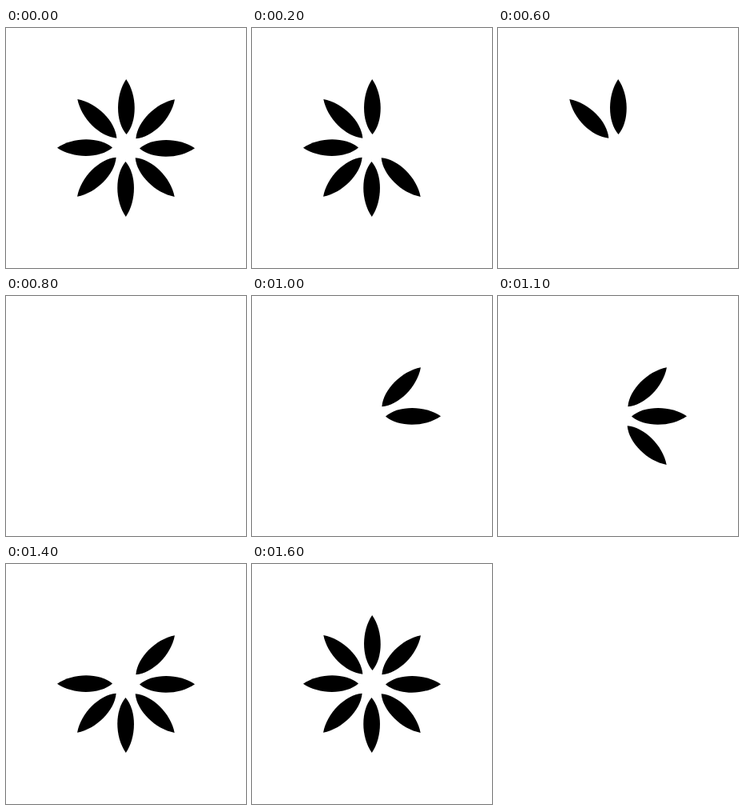
An HTML page that plays this animation: 300x300 px, repeating every 1700 ms.

```html
<!DOCTYPE html>
<html lang="en">
<head>
<meta charset="utf-8">
<title>Petal spinner</title>
<style>
html, body { margin: 0; width: 100%; height: 100%; overflow: hidden; background: #fff; }
svg { display: block; width: 100vw; height: 100vh; }
</style>
</head>
<body>
<svg id="stage" viewBox="0 0 300 300"></svg>
<script>
const NS = 'http://www.w3.org/2000/svg';
const COUNT = 8, STEP = 100, LOOP = 1700;
// Pointed outside, blunter inside, set slightly clockwise of its axis.
const LEAF = 'M0.2 -86 C14.2 -66 14.2 -33 0.5 -17 C-13.4 -33 -13.4 -66 0.2 -86Z';
const stage = document.getElementById('stage');

// Clockwise from the upper right, ending at the top.
const petals = Array.from({ length: COUNT }, (_, i) => {
  const angle = (i + 1) * 360 / COUNT;
  const leaf = document.createElementNS(NS, 'path');
  leaf.setAttribute('d', LEAF);
  leaf.setAttribute('transform', `translate(150 150) rotate(${angle})`);
  stage.appendChild(leaf);
  return leaf;
});

// Petals vanish one per step, then return in the same order.
function draw(ms) {
  const step = Math.floor((ms % LOOP) / STEP);
  petals.forEach((leaf, i) => {
    const hidden = step > i && step <= i + COUNT;
    leaf.setAttribute('visibility', hidden ? 'hidden' : 'visible');
  });
}

const start = performance.now();
function tick(now) {
  draw(Math.max(0, now - start));
  requestAnimationFrame(tick);
}
draw(0);
requestAnimationFrame(tick);
</script>
</body>
</html>
```
